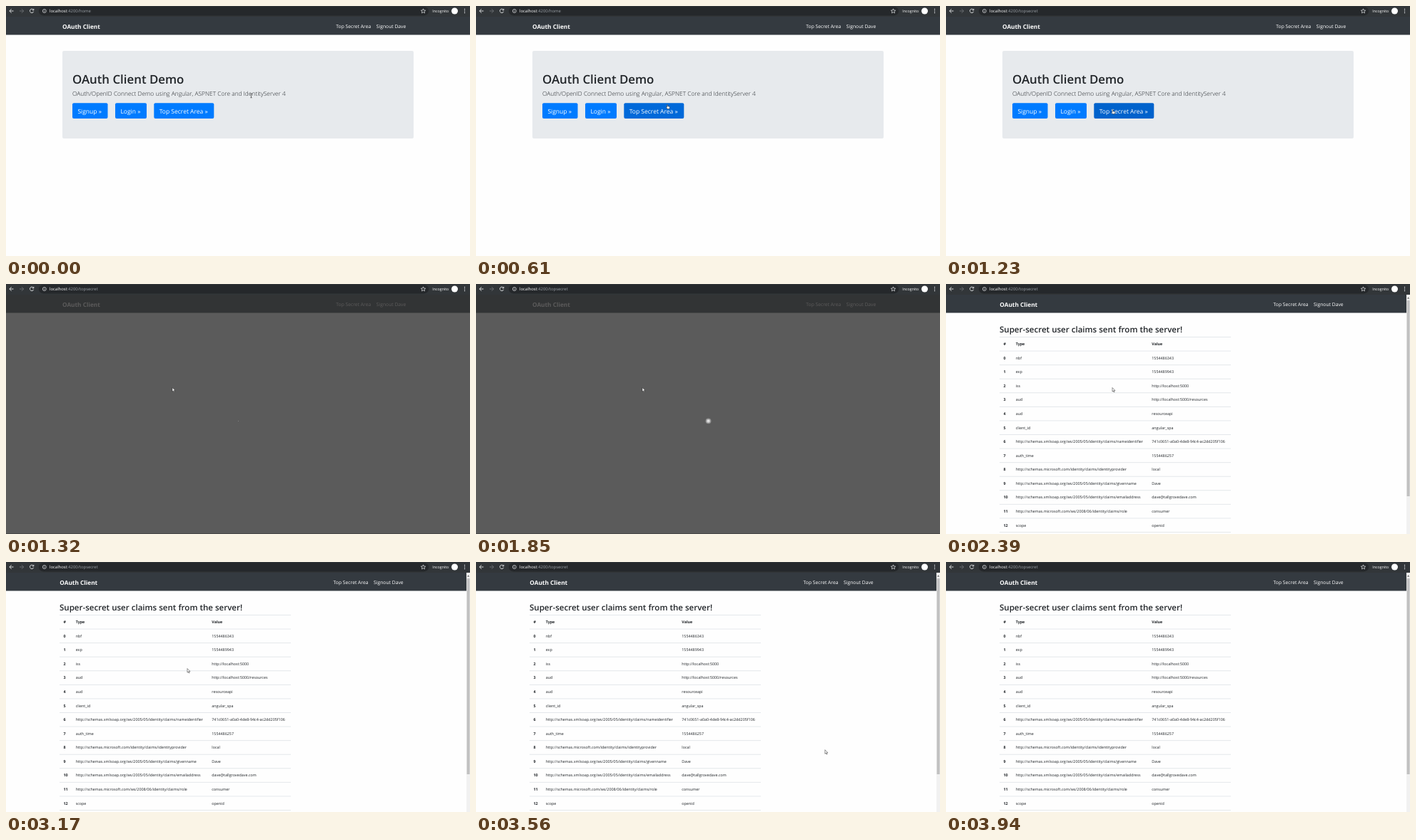
An HTML page that plays this animation: 650 px wide and 351 px high, repeating every 5340 ms.

```html
<!DOCTYPE html>
<html lang="en">
<head>
<meta charset="utf-8">
<title>OAuth Client</title>
<style>
  html, body { margin: 0; width: 100%; height: 100%; overflow: hidden; background: #fefefe; }
  svg { display: block; width: 650px; height: 351px; }
  text { font-family: "Open Sans", "Noto Sans", sans-serif; text-rendering: geometricPrecision; fill: #212529; white-space: pre; }
  .bar text { fill: #fff; font-size: 5.9px; }
  .bar .path { fill: #9aa0a6; }
  .icon { fill: none; stroke: #e8eaed; stroke-width: .9; }
  #nav text { fill: #fff; font-size: 6.75px; }
  #nav .brand { font-size: 8.25px; font-weight: 700; }
  #home .title { font-size: 16.85px; font-weight: 600; }
  #home .lead { font-size: 8.4px; font-weight: 300; }
  #home .label { fill: #fff; font-size: 8.5px; }
  #claims text { font-size: 5.37px; }
  #claims .title { font-size: 11.55px; font-weight: 600; }
  #claims .bold { font-weight: 700; }
  #claims line { stroke: #dee2e6; stroke-width: .8; }
</style>
</head>
<body>
<svg viewBox="0 0 650 351">
  <rect width="650" height="351" fill="#fefefe"/>

  <g id="nav">
    <rect x="-5" y="15" width="665" height="25.5" fill="#343a40"/>
    <text class="brand" x="79" y="31.5">OAuth Client</text>
    <text x="462.3" y="31">Top Secret Area</text>
    <text x="518.8" y="31">Signout Dave</text>
  </g>

  <g id="home">
    <rect x="79" y="63" width="492" height="123" rx="2" fill="#e7eaed"/>
    <text class="title" x="93" y="108.5">OAuth Client Demo</text>
    <text class="lead" x="93" y="126.3">OAuth/OpenID Connect Demo using Angular, ASPNET Core and IdentityServer 4</text>
  </g>

  <g id="claims">
    <text class="title" x="75" y="68">Super-secret user claims sent from the server!</text>
    <rect x="645" y="15" width="5" height="336" fill="#f1f1f1"/>
    <rect x="645.6" y="23" width="4" height="275" fill="#c1c1c1"/>
    <path d="M646 20.5l1.6-2 1.6 2z" fill="#555"/>
  </g>

  <g id="loading">
    <rect y="15" width="650" height="336" fill="#333" opacity=".8"/>
    <rect y="350" width="650" height="1" fill="#494949"/>
    <g id="balls" fill="#fff"></g>
  </g>

  <g class="bar">
    <rect width="650" height="15" fill="#323639"/>
    <rect x="46" y="1" width="546" height="12.4" rx="6.2" fill="#25282b"/>
    <path class="icon" d="M10.5 7H5M7.6 4.2L4.8 7l2.8 2.8"/>
    <path class="icon" style="stroke:#6d7175" d="M19 7h5.5M21.9 4.2L24.700 7l-2.800 2.800"/>
    <path class="icon" d="M38.300 5.200a2.700 2.700 0 1 0 .4 2.600M38.800 3.900v2h-2"/>
    <circle class="icon" cx="53.800" cy="7" r="2.500" style="stroke-width:.7"/>
    <path class="icon" style="stroke-width:.7" d="M53.800 6.600v1.800M53.800 5.300v.6"/>
    <text x="61" y="9.100">localhost<tspan class="path" id="route"></tspan></text>
    <path class="icon" style="stroke-width:.7" d="M584.500 3.900l.9 2.100 2.300.2-1.700 1.500.5 2.200-2-1.200-2 1.200.5-2.200-1.700-1.500 2.300-.2z"/>
    <text x="597.300" y="9" style="font-size:5.300px">Incognito</text>
    <circle cx="628.500" cy="7" r="4.500" fill="#fff"/>
    <g fill="#e8eaed"><circle cx="642.500" cy="4.500" r=".7"/><circle cx="642.500" cy="7" r=".7"/><circle cx="642.500" cy="9.500" r=".7"/></g>
  </g>

  <g id="cursor">
    <path id="arrow" d="M0 0v5.600l1.300-1.200.9 2 .9-.4-.9-1.900h1.800z" fill="#fff" stroke="#222" stroke-width=".5"/>
    <path id="hand" d="M0 .3q.6-.6 1 0v2l2.400.6q.6.3.4 1.200l-.5 2H.600L-1.200 3.800q.2-.8 1.200 0z" fill="#fff" stroke="#222" stroke-width=".5"/>
    <path id="beam" d="M0 .3h2.400M1.200 .3v5.400M0 5.700h2.400" fill="none" stroke="#222" stroke-width=".6"/>
  </g>
</svg>

<script>
const LOOP = 5340;
const $ = id => document.getElementById(id);
const show = (id, on) => $(id).style.display = on ? "" : "none";
const smooth = u => u * u * (3 - 2 * u);
const mix = (a, b, u) => a + (b - a) * u;
// Number of moves made at time t, for n moves spread evenly from start to end
const moves = (t, start, end, n) => t < start ? 0 :
  Math.min(n, 1 + Math.floor((t - start) / (end - start) * (n - 1) + .06));

function add(parent, tag, attrs, text = "") {
  const el = document.createElementNS("http://www.w3.org/2000/svg", tag);
  for (const key in attrs) el.setAttribute(key, attrs[key]);
  el.textContent = text;
  return $(parent).appendChild(el);
}

const buttons = [["Signup »", 93, 49.5], ["Login »", 153, 44], ["Top Secret Area »", 207.3, 84]].map(([label, x, width]) => {
  const box = add("home", "rect", { x, y: 136.3, width, height: 21.7, rx: 2, fill: "#007bff" });
  add("home", "text", { class: "label", x: x + 7.4, y: 150.6 }, label);
  return box;
});

const soap = "http://schemas.xmlsoap.org/ws/2005/05/identity/claims/";
const rows = [
  ["Type", "Value"],
  ["nbf", "1554486343"],
  ["exp", "1554489943"],
  ["iss", "http://localhost:5000"],
  ["aud", "http://localhost:5000/resources"],
  ["aud", "resourceapi"],
  ["client_id", "angular_spa"],
  [soap + "nameidentifier", "741c0651-a0a0-4de8-94c4-ac2dd205f106"],
  ["auth_time", "1554486257"],
  ["http://schemas.microsoft.com/identity/claims/identityprovider", "local"],
  [soap + "givenname", "Dave"],
  [soap + "emailaddress", "dave@tallgrovedave.com"],
  ["http://schemas.microsoft.com/ws/2008/06/identity/claims/role", "consumer"],
  ["scope", "openid"]
];
const rowHeight = 19.57;
rows.forEach(([type, value], i) => {
  const y = 86.2 + i * rowHeight, style = i ? "" : "bold";
  add("claims", "text", { class: "bold", x: 80.5, y }, i ? i - 1 : "#");
  add("claims", "text", { class: style, x: 97.7, y }, type);
  add("claims", "text", { class: style, x: 288.3, y }, value);
});
for (let i = 0; i <= rows.length; i++) {
  const y = 74.5 + i * rowHeight;
  add("claims", "line", { x1: 75, x2: 399, y1: y, y2: y });
}

const balls = [0, 1, 2].map(() => add("balls", "circle", { cx: 325.5, cy: 192.3 }));

function drawSpinner(t) {
  const age = moves(t, 1320, 2310, 14) * 76.5 - 20;
  balls.forEach((ball, i) => {
    const local = age - i * 200;
    const u = local < 0 ? 0 : local % 1000 / 1000;
    ball.setAttribute("r", 6.6 * u);
    ball.setAttribute("opacity", .75 * Math.min(u / .05, (1 - u) / .95));
  });
}

function drawCursor(t) {
  let x, y;
  const leaving = moves(t, 3170, 3940, 11);
  if (t < 3170) {
    const u = smooth(moves(t, 310, 830, 8) / 8);
    x = mix(342.3, 233, u);
    y = mix(123, 145.5, u);
  } else {
    const u = smooth(Math.min(1, (leaving + .5) / 10.5));
    x = mix(233, 612, u);
    y = mix(146, 350, u ** 1.4);
  }
  const home = t < 1320, hover = home && x < 291 && y > 136.3;
  const beam = home && y < 130;
  show("cursor", leaving < 11);
  show("hand", hover);
  show("beam", beam);
  show("arrow", !hover && !beam);
  $("cursor").setAttribute("transform", `translate(${x} ${y})`);
  buttons[2].setAttribute("fill", t >= 1140 ? "#0062cc" : hover ? "#0069d9" : "#007bff");
}

function draw(now) {
  const t = now % LOOP, loaded = t >= 2390;
  $("route").textContent = t < 1230 ? ":4200/home" : ":4200/topsecret";
  $("nav").setAttribute("transform", `translate(${loaded ? -3.7 : 0})`);
  show("home", t < 1320);
  show("loading", t >= 1320 && !loaded);
  show("claims", loaded);
  drawSpinner(t);
  drawCursor(t);
}

const start = performance.now();
function tick() {
  draw(performance.now() - start);
  requestAnimationFrame(tick);
}
tick();
</script>
</body>
</html>
```
